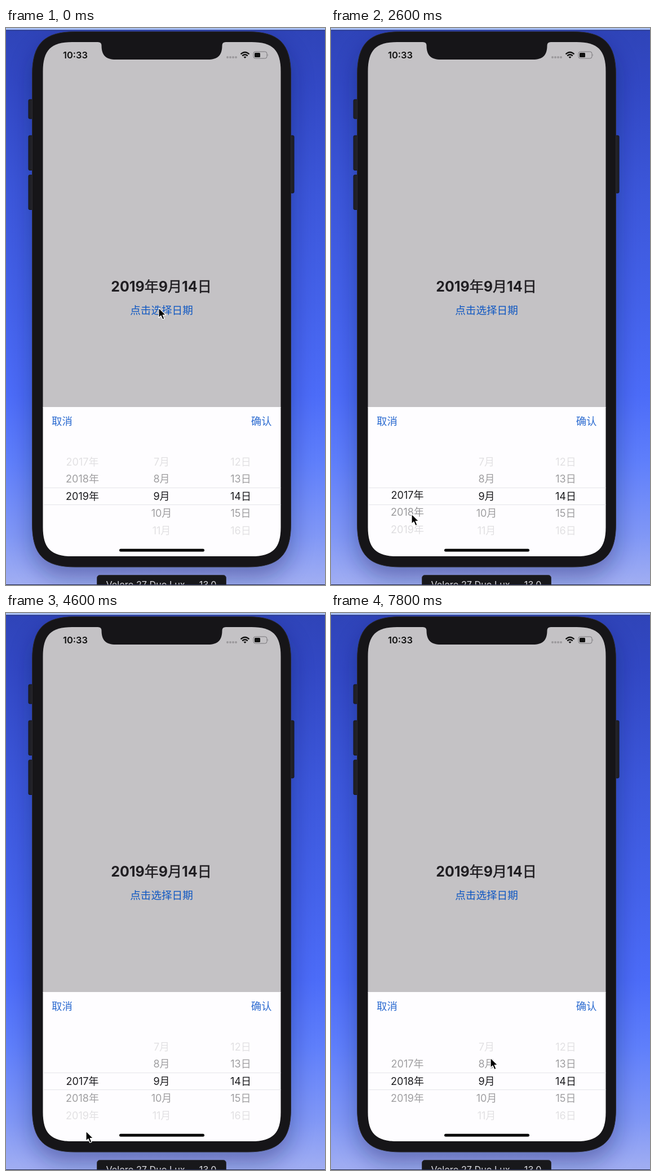
An HTML page that plays this animation: 566 by 989 pixels, repeating every 8000 ms.

```html
<!DOCTYPE html>
<html lang="zh-CN">
<head>
<meta charset="utf-8">
<title>日期选择</title>
<style>
  html, body { margin: 0; width: 100%; height: 100%; overflow: hidden; background: #3a55d8; }
  svg { display: block; width: 100%; height: 100%; }
  text { font-family: Inter, "Noto Sans CJK SC", "Noto Sans CJK", sans-serif; font-size: 18px; }
  .mid { text-anchor: middle; }
  .title { font-size: 25px; font-weight: 700; fill: #201e22; }
  .title tspan { font-weight: 400; stroke: #201e22; stroke-width: .6; }
  .link { font-size: 18.6px; fill: #0f57c2; }
  .action { font-size: 18.4px; fill: #2c6bd0; }
  .row { fill: #1b1b1e; }
</style>
</head>
<body>
<svg viewBox="0 0 566 989" preserveAspectRatio="none">
  <defs>
    <linearGradient id="sky" x2="0" y2="1">
      <stop offset="0" stop-color="#2f44b8"/>
      <stop offset=".1" stop-color="#3248c4"/>
      <stop offset=".3" stop-color="#3c57da"/>
      <stop offset=".5" stop-color="#4462ea"/>
      <stop offset=".66" stop-color="#4c6cf8"/>
      <stop offset=".78" stop-color="#5f7ffb"/>
      <stop offset=".91" stop-color="#8097f6"/>
      <stop offset="1" stop-color="#a1aef2"/>
    </linearGradient>
    <filter id="blur" x="-30%" y="-20%" width="160%" height="140%"><feGaussianBlur stdDeviation="20"/></filter>
    <clipPath id="screen"><path id="glass"/></clipPath>
    <clipPath id="band"><rect x="65" y="816" width="424" height="30"/></clipPath>
    <clipPath id="outside"><path d="M65 740H489V816H65ZM65 846H489V916H65Z"/></clipPath>
  </defs>

  <rect width="566" height="989" fill="url(#sky)"/>
  <rect x="46" y="26" width="460" height="950" rx="60" fill="#0c1455" opacity=".38" filter="url(#blur)"/>
  <rect width="566" height="3.5" fill="#a9c0f3"/>
  <rect y="3.5" width="566" height="1.5" fill="#26368c"/>

  <g fill="#202026" stroke="#15151a">
    <rect x="40" y="127" width="12" height="34" rx="2"/>
    <rect x="40" y="191" width="12" height="61.5" rx="2"/>
    <rect x="40" y="261" width="12" height="61.5" rx="2"/>
    <rect x="499" y="191" width="12" height="102" rx="2"/>
  </g>
  <path id="body" fill="#161518" stroke="#2b2a30"/>

  <g clip-path="url(#screen)">
    <rect x="65" y="25" width="424" height="649" fill="#c4c2c5"/>
    <rect x="65" y="673" width="424" height="266" fill="#fefdff"/>
    <path d="M67 816.5H488M67 846.5H488" stroke="#e5e5e9"/>
  </g>
  <path d="M163 24V25Q169.500 25 169.500 31C169.500 48.500 177 56 195 56H358C376 56 383.500 48.500 383.500 31Q383.500 25 390 25V24Z" fill="#161518"/>

  <text class="mid" x="123" y="54" style="font-size:16.5px;font-weight:600" fill="#111">10:33</text>
  <g fill="#9b999c">
    <circle cx="393" cy="52" r="2"/><circle cx="398" cy="52" r="2"/>
    <circle cx="403" cy="52" r="2"/><circle cx="408" cy="52" r="2"/>
  </g>
  <g fill="none" stroke="#111" stroke-width="2.3">
    <path d="M416.500 46.500Q424 39.500 431.500 46.500M419.200 49.400Q424 45.200 428.800 49.400"/>
    <path d="M421.500 51.300Q424 49.500 426.500 51.300L424 54Z" fill="#111" stroke="none"/>
  </g>
  <rect x="439" y="42" width="24" height="12" rx="3.5" fill="none" stroke="#777579"/>
  <rect x="441" y="44" width="10" height="8" rx="1.5" fill="#111"/>
  <path d="M464.500 46Q466 48 464.500 50Z" fill="#777579"/>

  <text class="mid title" x="275.500" y="468">2019<tspan>年</tspan>9<tspan>月</tspan>14<tspan>日</tspan></text>
  <text class="mid link" x="276" y="508">点击选择日期</text>
  <text class="action" x="81" y="705">取消</text>
  <text class="action" x="471.500" y="705" text-anchor="end">确认</text>

  <g id="faded" clip-path="url(#outside)"></g>
  <g id="selected" clip-path="url(#band)"></g>
  <rect x="201" y="924.800" width="151" height="5" rx="2.500" fill="#050505"/>

  <rect x="161.500" y="971.500" width="229" height="30" rx="5" fill="#18181b" stroke="#34343f"/>
  <text class="mid" x="275.500" y="994" style="font-size:16.200px" fill="#dddde2">Veloro 27 Duo Lux — 13.0</text>
  <rect y="988" width="566" height="1" fill="#20264c"/>

  <path id="cursor" d="M0 0V17.500L4 13.800L6.800 20.500L10 19.200L7.200 12.600H12.600Z" fill="#000" stroke="#fff" stroke-width="1.200" stroke-linejoin="round"/>
</svg>
<script>
const LOOP = 8000, STEP = 200, ROW = 30.5, CENTER = 831;

// [time, value...]: eased between neighbours
const pointerPath = [
  [0, 271, 497], [400, 271, 497], [1200, 139, 821], [1400, 139, 821],
  [2000, 139, 848], [2600, 143, 863], [3600, 143, 863],
  [4400, 142, 920], [4800, 142, 920], [5600, 140, 855], [5800, 140, 855],
  [6600, 142, 822], [7000, 142, 822], [7800, 283, 790], [8000, 283, 790]
];
const yearPath = [[0, 2], [1400, 2], [2000, 1.13], [2700, 0], [5800, 0], [6600, 1], [8000, 1]];

// Rectangle whose corners ease into the sides instead of being plain arcs
function smoothRect(id, left, top, right, bottom, radius) {
  const reach = 1.28 * radius, pull = 0.354 * radius;
  const corner = (x, y, dx, dy, fromSide) => {
    const side = [x, y + dy * reach], sidePull = [x, y + dy * pull];
    const edge = [x + dx * reach, y], edgePull = [x + dx * pull, y];
    return fromSide ? `${side}C${sidePull} ${edgePull} ${edge}` : `${edge}C${edgePull} ${sidePull} ${side}`;
  };
  const corners = [
    corner(left, top, 1, 1, true), corner(right, top, -1, 1, false),
    corner(right, bottom, -1, -1, true), corner(left, bottom, 1, -1, false)
  ];
  document.getElementById(id).setAttribute("d", `M${corners.join("L")}Z`);
}

function sample(path, time) {
  const next = Math.max(1, path.findIndex(key => key[0] > time));
  const [from, to] = [path[next - 1], path[next]];
  const u = (time - from[0]) / (to[0] - from[0]);
  const eased = u * u * (3 - 2 * u);
  return from.slice(1).map((value, i) => value + (to[i + 1] - value) * eased);
}

function addRow(parent, x, label) {
  const node = document.createElementNS("http://www.w3.org/2000/svg", "text");
  node.setAttribute("class", "mid row");
  node.setAttribute("x", x);
  node.textContent = label;
  return document.getElementById(parent).appendChild(node);
}

function makeWheel(x, first, count, unit) {
  const rows = Array.from({ length: count }, (_, i) =>
    ["faded", "selected"].map(parent => addRow(parent, x, first + i + unit)));
  return position => rows.forEach(([faded, selected], i) => {
    const offset = i - position;
    for (const node of [faded, selected]) node.setAttribute("y", CENTER + 6.5 + offset * ROW);
    faded.setAttribute("opacity", Math.max(0, 0.71 - 0.295 * Math.abs(offset)));
  });
}

smoothRect("body", 46.5, 6.5, 505.5, 957, 60);
smoothRect("glass", 65.5, 25, 487.5, 938, 40.5);

const turnYear = makeWheel(135.5, 2017, 3, "年");
makeWheel(276, 7, 5, "月")(2);
makeWheel(416.5, 12, 5, "日")(2);
const cursor = document.getElementById("cursor");

function draw(now) {
  const time = Math.floor((now % LOOP) / STEP) * STEP;
  turnYear(sample(yearPath, time)[0]);
  cursor.setAttribute("transform", `translate(${sample(pointerPath, time)})`);
}

const start = performance.now();
function tick() {
  draw(performance.now() - start);
  requestAnimationFrame(tick);
}
tick();
</script>
</body>
</html>
```
